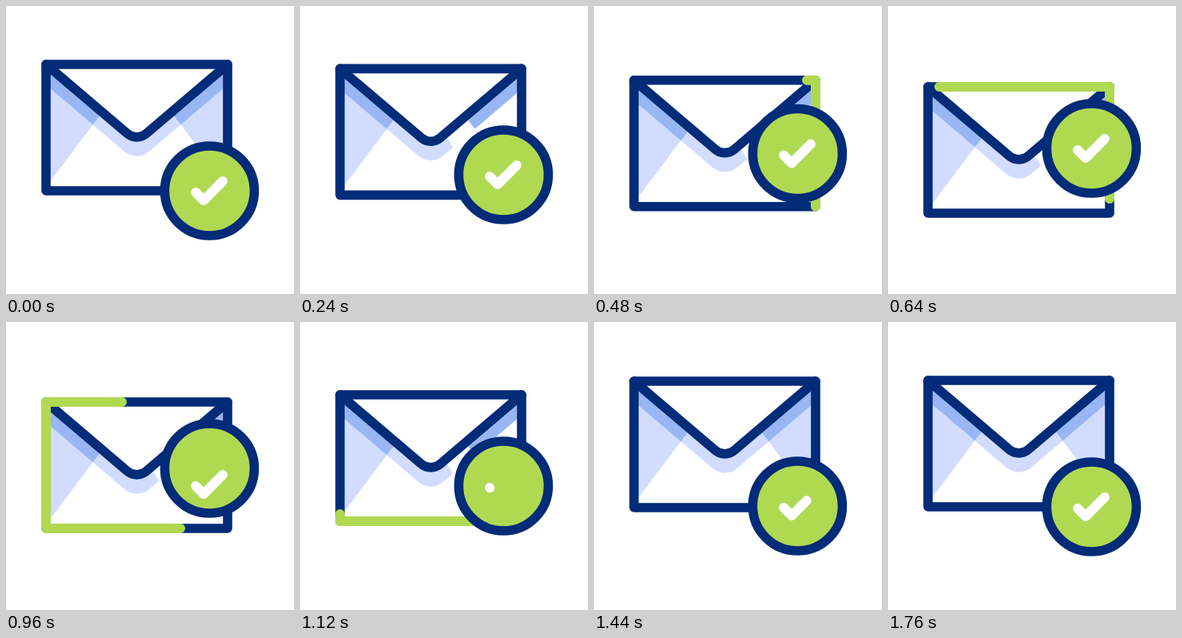
Recreate the animation shown at these times as an HTML page with a canvas. Size 360 px wide and 360 px high, loop 2000 ms.

```html
<!DOCTYPE html>
<html lang="en">
<head>
<meta charset="utf-8">
<title>Mail confirmed</title>
<style>
html, body { margin: 0; width: 100%; height: 100%; overflow: hidden; background: #fff; }
canvas { display: block; width: 360px; height: 360px; }
</style>
</head>
<body>
<canvas id="stage" width="360" height="360"></canvas>
<script>
const ctx = document.getElementById('stage').getContext('2d');
const NAVY = '#022b78', GREEN = '#b0d952', LIGHT = '#d1dcff', MID = '#98b6f3', WHITE = '#fff';
const LOOP = 2000, STEP = 40;
const LEFT = 50, RIGHT = 277, WIDTH = RIGHT - LEFT, HEIGHT = 158;
const PERIMETER = 2 * (WIDTH + HEIGHT), LINE = 11.6;

// Smooth curve through [time, value] keys that never overshoots.
function track(keys) {
  const slope = i => (keys[i + 1][1] - keys[i][1]) / (keys[i + 1][0] - keys[i][0]);
  const tangent = i => {
    if (i === 0 || i === keys.length - 1) return 0;
    const a = slope(i - 1), b = slope(i);
    return a * b <= 0 ? 0 : 2 * a * b / (a + b);
  };
  return t => {
    if (t <= keys[0][0]) return keys[0][1];
    const i = keys.findIndex(k => k[0] >= t) - 1;
    if (i < 0) return keys[keys.length - 1][1];
    const [t0, v0] = keys[i], [t1, v1] = keys[i + 1];
    const d = t1 - t0, u = (t - t0) / d, w = 1 - u;
    return w * w * (1 + 2 * u) * v0 + u * u * (3 - 2 * u) * v1
      + d * u * w * (w * tangent(i) - u * tangent(i + 1));
  };
}

const mailDrop = track([[80, 0], [360, 12], [640, 28], [800, 29.5], [960, 27], [1120, 18], [1200, 10.5], [1440, 1], [1640, 0]]);
const badgeLift = track([[80, 0], [360, 38], [640, 53], [760, 54], [960, 48], [1120, 26], [1200, 13], [1440, 1], [1640, 0]]);
const glowHead = track([[160, 0], [360, 60], [640, 371], [960, 711], [1130, PERIMETER]]);
const glowTail = track([[560, 0], [640, 18], [960, 290], [1120, 534], [1440, PERIMETER]]);

function trace(points) {
  ctx.beginPath();
  points.forEach(([x, y]) => ctx.lineTo(x, y));
}

function fill(points, color) {
  trace(points);
  ctx.closePath();
  ctx.fillStyle = color;
  ctx.fill();
}

function stroke(color, width = LINE) {
  ctx.strokeStyle = color;
  ctx.lineWidth = width;
  ctx.stroke();
}

function flapPath(dy = 0) {
  ctx.beginPath();
  ctx.moveTo(LEFT, dy);
  ctx.arcTo(163.5, 96.5 + dy, RIGHT, dy, 18);
  ctx.lineTo(RIGHT, dy);
}

// The part of a polyline between two distances along it.
function section(points, from, to) {
  const out = [];
  let run = 0;
  for (let i = 1; i < points.length; i++) {
    const [x0, y0] = points[i - 1], [x1, y1] = points[i];
    const length = Math.hypot(x1 - x0, y1 - y0);
    const a = Math.max(0, from - run), b = Math.min(length, to - run);
    if (a <= b) {
      for (const s of [a, b]) out.push([x0 + (x1 - x0) * s / length, y0 + (y1 - y0) * s / length]);
    }
    run += length;
  }
  return out;
}

function shadeBand(color) {
  flapPath(18);
  stroke(color);
  flapPath(9);
  stroke(color, LINE + 2);
}

function drawShades(raised) {
  const leftSide = [[LEFT, 0], [117, 64], [57, 144], [LEFT, 144]];
  const rightSide = leftSide.map(([x, y]) => [LEFT + RIGHT - x, y]);

  ctx.save();
  trace([[LEFT, 0], [RIGHT, 0], [RIGHT, HEIGHT], [LEFT, HEIGHT]]);
  ctx.clip();

  ctx.save();
  if (raised) {
    trace([[LEFT, 0], [125, 0], [184, 87], [191, 98], [191, HEIGHT], [LEFT, HEIGHT]]);
    ctx.clip();
  }
  shadeBand(LIGHT);
  ctx.restore();

  fill(leftSide, LIGHT);
  if (!raised) fill(rightSide, LIGHT);
  for (const side of [leftSide, rightSide]) {
    ctx.save();
    trace(side);
    ctx.clip();
    shadeBand(MID);
    ctx.restore();
  }

  flapPath();
  ctx.fillStyle = WHITE;
  ctx.fill();
  ctx.restore();
}

function drawMail(t) {
  ctx.save();
  ctx.translate(0, 73 + mailDrop(t));
  drawShades(badgeLift(t) > 20);
  flapPath();
  stroke(NAVY);
  ctx.beginPath();
  ctx.rect(LEFT, 0, WIDTH, HEIGHT);
  stroke(NAVY);

  const head = glowHead(t), tail = glowTail(t);
  if (head > tail) {
    const outline = [[RIGHT, HEIGHT], [RIGHT, 0], [LEFT, 0], [LEFT, HEIGHT], [RIGHT, HEIGHT]];
    trace(section(outline, tail, head));
    stroke(GREEN, LINE + 0.4);
  }
  ctx.restore();
}

function drawCheck(t) {
  const redrawAt = 1100;
  let drawn = 1, fall = 0;
  if (t >= redrawAt) {
    const u = Math.min(1, (t - redrawAt) / 460);
    drawn = (1 - Math.cos(Math.PI * u)) / 2;
  } else if (t > 780) {
    fall = 20 * ((t - 780) / 180) ** 2.5;
  }
  ctx.save();
  ctx.beginPath();
  ctx.arc(0, 0, 50.5, 0, 2 * Math.PI);
  ctx.clip();
  ctx.translate(0, fall);
  const check = [[-17.3, 2], [-7.3, 12], [16.5, -12]];
  trace(section(check, 0, Math.max(0.1, drawn * 48)));
  stroke(WHITE, 12);
  ctx.restore();
}

function drawBadge(t) {
  ctx.save();
  ctx.translate(254.4, 231 - badgeLift(t));
  ctx.beginPath();
  ctx.arc(0, 0, 56, 0, 2 * Math.PI);
  ctx.fillStyle = GREEN;
  ctx.fill();
  stroke(NAVY);
  drawCheck(t);
  ctx.restore();
}

function frame(now) {
  const t = Math.floor((now % LOOP) / STEP) * STEP;
  ctx.fillStyle = WHITE;
  ctx.fillRect(0, 0, 360, 360);
  ctx.lineCap = ctx.lineJoin = 'round';
  drawMail(t);
  drawBadge(t);
}

const start = performance.now();
function tick() {
  frame(performance.now() - start);
  requestAnimationFrame(tick);
}
tick();
</script>
</body>
</html>
```
